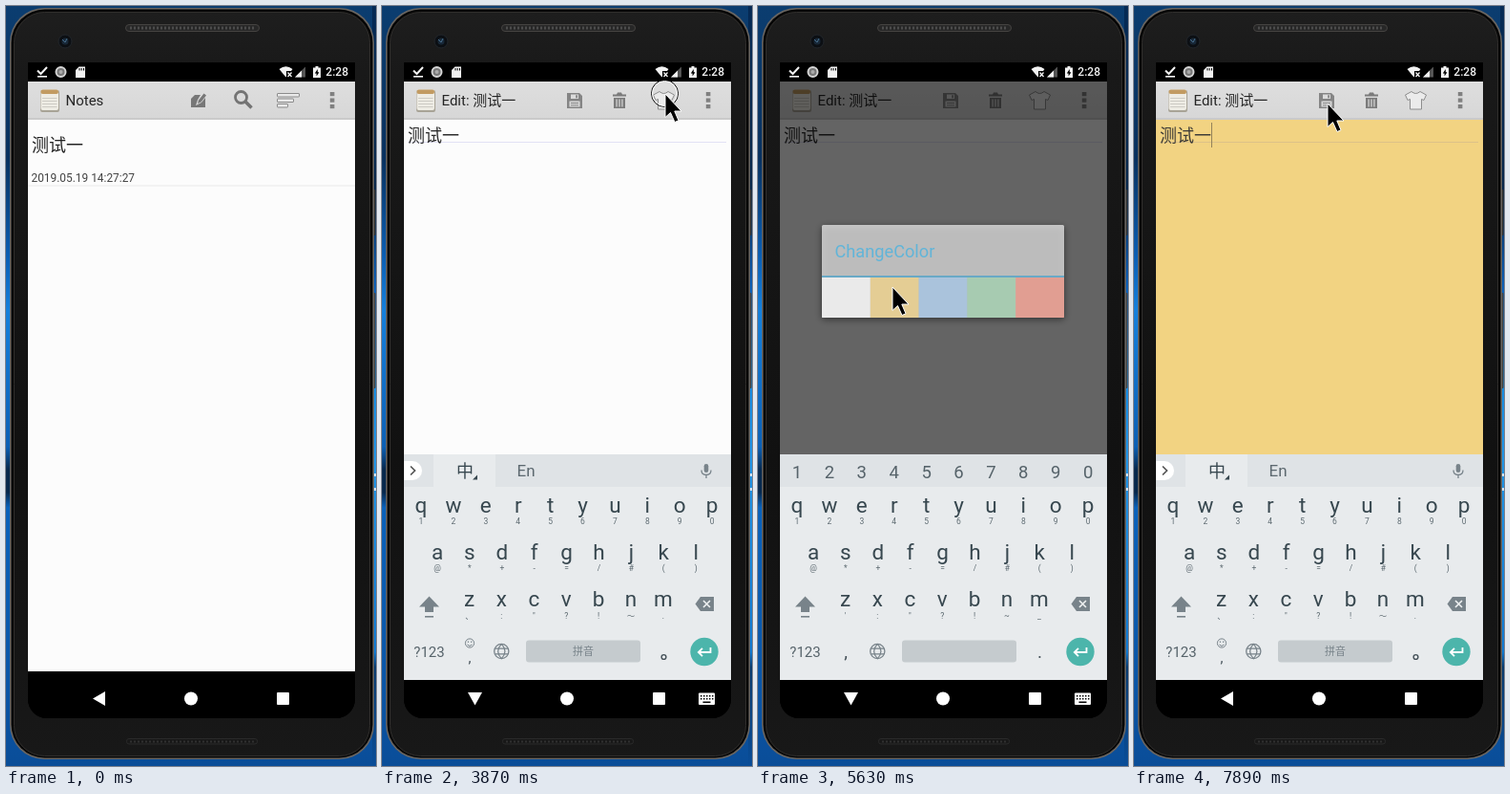
An HTML page with a canvas that plays this animation: 388x795 px, repeating every 8000 ms.

```html
<!DOCTYPE html>
<html lang="zh-CN">
<head>
<meta charset="utf-8">
<title>Notes colour change</title>
<style>
html, body { margin: 0; width: 100%; height: 100%; overflow: hidden; background: #0b3c70; }
canvas { display: block; }
</style>
</head>
<body>
<canvas id="stage" width="388" height="795"></canvas>
<script>
const LOOP = 8000;
const FONT = "Roboto, 'Noto Sans CJK SC', 'Noto Sans CJK', sans-serif";
const c = document.getElementById('stage').getContext('2d');

// ---------- helpers ----------
function rect(x, y, w, h, color) { c.fillStyle = color; c.fillRect(x, y, w, h); }

function round(x, y, w, h, r, fill, line) {
  c.beginPath();
  c.roundRect(x, y, w, h, r);
  if (fill) { c.fillStyle = fill; c.fill(); }
  if (line) { c.strokeStyle = line; c.stroke(); }
}

function disc(x, y, r, fill, line) {
  c.beginPath();
  c.arc(x, y, r, 0, Math.PI * 2);
  if (fill) { c.fillStyle = fill; c.fill(); }
  if (line) { c.strokeStyle = line; c.stroke(); }
}

function shape(d, fill, line, width = 1) {
  const p = new Path2D(d);
  if (fill) { c.fillStyle = fill; c.fill(p, 'evenodd'); }
  if (line) { c.lineWidth = width; c.strokeStyle = line; c.stroke(p); c.lineWidth = 1; }
}

function text(s, x, y, size, color, align = 'left', weight = 400) {
  c.font = `${weight} ${size}px ${FONT}`;
  c.textAlign = align;
  c.fillStyle = color;
  c.fillText(s, x, y);
}

function at(x, y, alpha, draw) {
  c.save();
  c.translate(x, y);
  c.globalAlpha *= alpha;
  draw();
  c.restore();
}

function fade(x0, y0, x1, y1, stops) {
  const g = c.createLinearGradient(x0, y0, x1, y1);
  stops.forEach(([p, color]) => g.addColorStop(p, color));
  return g;
}

// last entry whose time has come
function step(t, keys) {
  let value = keys[0][1];
  for (const [k, v] of keys) if (t >= k) value = v;
  return value;
}

const within = (t, spans) => spans.some(([a, b]) => t >= a && t < b);

// ---------- desktop and phone ----------
function desktop() {
  rect(0, 0, 388, 795, fade(0, 0, 0, 795, [
    [0, '#0b3d70'], [.2, '#08315f'], [.33, '#0b5fb4'], [.4, '#1580dc'], [.58, '#0c60b5'],
    [.61, '#08294d'], [.64, '#08294d'], [.66, '#0a62bb'], [.9, '#0a55a6'], [1, '#0a4d98']]));
  rect(384, 0, 4, 795, fade(0, 0, 0, 795, [
    [0, '#052a55'], [.24, '#06264a'], [.37, '#0b5db5'], [.5, '#168ae0'],
    [.6, '#2094e6'], [.85, '#0f78d0'], [.87, '#07396d'], [1, '#0a4d98']]));
  rect(385, 489, 3, 3, '#cfe4f6');
  rect(385, 504, 3, 3, '#cfe4f6');
}

function phone() {
  round(384, 192, 3.5, 48, 1, '#34322f');
  round(384, 300, 3.5, 100, 1, '#45423f');
  round(4, 2, 382, 786, 36, '#696561');
  round(5.5, 3.5, 379, 783, 35, '#060606');
  round(8.5, 6.5, 373, 778, 32, fade(0, 6, 0, 785,
    [[0, '#1e1e1e'], [.08, '#191919'], [.6, '#111'], [1, '#181818']]), '#302e2c');
  round(125.5, 19.5, 140, 7, 3.5, '#272727', '#454341');
  c.setLineDash([2, 2]);
  shape('M130 23H262', null, '#4c4c4c', 3);
  shape('M130 769.5H260', null, '#303030', 2);
  c.setLineDash([]);
  round(126.5, 766.5, 137, 5.5, 2.5, null, '#2a2a2a');
  disc(62, 37, 7, '#0c0f13', '#22262b');
  disc(62, 37, 3.5, '#182838');
  shape('M59 35L62 38L64 34', null, '#48708f');
}

function statusBar() {
  const w = '#f2f2f2';
  rect(23, 59, 343, 20, '#000');
  shape('M33 67.5L36.5 71L43 64', null, w, 2);
  rect(33, 73, 10, 1.6, w);
  c.lineWidth = 2;
  disc(57.5, 69, 5, '#777', '#d5d5d5');
  c.lineWidth = 1;
  disc(57.5, 69, 2, '#aaa');
  shape('M73 67L76.5 63.5H83V75H73ZM76.5 65V67.5H77.5V65ZM78.7 65V67.5H79.7V65ZM81 65V67.5H82V65Z', w);
  shape('M286.5 66Q293.5 60.5 300.5 66L299 68H294V73.5L293.5 74.5Z', w);
  shape('M295.5 69.5L299.5 74M299.5 69.5L295.5 74', null, w, 1.3);
  shape('M303 74.5L314 63.5V74.5Z', '#555');
  shape('M303 74.5L310 67.5V74.5Z', w);
  shape('M322 64.5H324.5V63H327.5V64.5H330V75H322ZM326.8 66L323.8 70.4H325.6V73.6L328.4 69.2H326.8Z', w);
  text('2:28', 359, 73.3, 12, w, 'right', 500);
}

function navBar(top, keyboardUp, extra) {
  const w = '#fff';
  rect(23, top, 343, 745 - top, '#000');
  shape(keyboardUp ? 'M90 718H105L97.5 731.5Z' : 'M91 724.5L104 717V732Z', w);
  disc(194, 724.5, 7, w);
  round(284, 718, 13, 13, 1, w);
  if (!extra) return;
  round(332, 718.5, 17, 12.5, 1, w);
  for (let i = 0; i < 5; i++) {
    rect(334 + i * 3, 721, 1.5, 1.5, '#000');
    rect(334 + i * 3, 724, 1.5, 1.5, '#000');
  }
  rect(336.5, 727.5, 8, 1.5, '#000');
}

// ---------- app screens ----------
function appBar(title) {
  rect(23, 79, 343, 40, fade(0, 79, 0, 118, [[0, '#dedede'], [1, '#d7d7d7']]));
  rect(23, 117.5, 343, 1, '#bdbdbd');
  round(36, 88, 20, 23, 2, '#a8a396');
  round(36.5, 87.5, 18.5, 21.5, 2, '#eeece4');
  round(36.5, 87.5, 18.5, 4.5, 2, '#c29b62');
  for (let y = 96; y < 108; y += 3) rect(38, y, 15.5, .8, '#c6c4bd');
  text(title, 62.5, 104.3, 15, '#252525');
  for (let y = 90; y < 107; y += 6.5) rect(339.8, y, 4.6, 4.2, '#808080');
}

function listScreen() {
  rect(23, 79, 343, 617, '#fcfcfc');
  appBar('Notes');
  shape('M194 97L198 93H204L201 98L199 104L205 101L209 96V106H194Z', '#777');
  shape('M201 102L202 98.5L207.5 91.5L210 93.5L204.5 100.5Z', '#777');
  c.lineWidth = 2.8;
  disc(246.5, 95.5, 6, null, '#747474');
  c.lineWidth = 1;
  shape('M251 100L257.5 106.5', null, '#747474', 3.6);
  [23, 17, 11].forEach((w, i) =>
    round(284.5, 91.5 + i * 5.5, w, 3.5, .5, '#e9e9e9', '#8b8b8b'));
  text('测试一', 27, 152, 18, '#222');
  text('2019.05.19 14:27:27', 26.5, 184.4, 11.9, '#444');
  rect(23, 187.5, 343, 1, '#ececec');
}

function editScreen(yellow, caret) {
  rect(23, 79, 343, 626, yellow ? '#f2d382' : '#fcfcfc');
  appBar('Edit: 测试一');
  const g = '#858585';
  shape('M194 91H207L210 94V107H194ZM198 92.5V97H206V92.5ZM203.2 93.2H205V96.3H203.2ZM196.5 99.5V105.5H207.5V99.5Z', g);
  rect(198, 101, 8, 1, g);
  rect(198, 103.3, 8, 1, g);
  shape('M242 92.5H246L247 90.5H251L252 92.5H256V94.5H242ZM243 96H255V107H243ZM245.5 97.5V105.5H246.7V97.5ZM248.4 97.5V105.5H249.6V97.5ZM251.3 97.5V105.5H252.5V97.5Z', '#7b7b7b');
  shape('M291 89.5Q295.5 93.5 300 89.5L306.5 93L304 98.5L301.5 97.5V108H289.5V97.5L287 98.5L284.5 93Z', '#ebebeb', '#8d8d8d');
  rect(27, 142, 334, 1, yellow ? '#dcc188' : '#e2e1f5');
  text('测试一', 27, 142, 18, yellow ? '#3c3a36' : '#2a2a2a');
  if (caret) rect(81, 122, 1, 26, yellow ? '#94835a' : '#8a8a8a');
}

// ---------- keyboard ----------
function keyRow(letters, hints, x, y, gap) {
  [...letters].forEach((k, i) => {
    text(k, x + i * 33.9, y, 22.5, '#37474f', 'center');
    text(hints[i], x + i * 33.9, y + gap, 8.5, '#5d6a71', 'center');
  });
}

function keyboard(pinyin) {
  const g = '#78838a';
  rect(23, 469, 343, 236, '#e8ebed');
  rect(23, 469, 343, 34, '#dfe3e6');
  if (pinyin) {
    rect(54, 469, 65, 34, '#e8ebed');
    round(13, 476, 29, 20, 10, '#fff');
    shape('M30 481.5L34.5 486L30 490.5', null, '#555', 1.7);
    text('中', 87, 492.5, 18, '#37474f', 'center');
    shape('M100 490.5V495.5H95Z', '#37474f');
    text('En', 151, 492, 17, '#5c686f', 'center');
    round(337.7, 479, 4.6, 9, 2.3, g);
    shape('M335 485.5Q335 490.5 340 490.5Q345 490.5 345 485.5M340 490.5V494', null, g, 1.3);
  } else {
    [...'1234567890'].forEach((n, i) => text(n, 41 + i * 33.9, 493.5, 18.5, '#56636a', 'center'));
  }
  keyRow('qwertyuiop', [...'1234567890'], 41, 530, 12);
  keyRow('asdfghjkl', [...'@*+-=/#()'], 58, 579, 12);
  keyRow('zxcvbnm', [...(pinyin ? '、:"?!～.' : '\':"?!~_')], 91.5, 628, 13);

  shape('M49.5 617.5L60 628.5H54V634H45V628.5H39Z', g);
  rect(45, 638, 9, 1.6, g);
  shape('M328.5 625.5L334 618H348V633H334Z', g);
  shape('M337 622L344 629M344 622L337 629', null, '#eef0f1', 1.6);

  text('?123', 49.5, 680.5, 15, '#56636a', 'center');
  if (pinyin) {
    disc(92, 666.5, 4.6, null, g);
    rect(89.8, 664.5, 1.3, 1.3, g);
    rect(93, 664.5, 1.3, 1.3, g);
    shape('M89.5 668Q92 671 94.5 668', null, g);
    text(',', 92, 687, 15, '#455159', 'center');
  } else {
    text(',', 92, 682, 19, '#455159', 'center');
  }
  c.lineWidth = 1.3;
  disc(125.3, 675, 7.6, null, g);
  c.lineWidth = 1;
  shape('M125.3 667.4Q118 675 125.3 682.6Q132.6 675 125.3 667.4M118.7 672.2H132M118.7 677.8H132', null, g, 1.2);
  round(151, 663.5, 120, 23, 3, '#c5cbce');
  if (pinyin) {
    text('拼音', 211, 679, 11, '#78838a', 'center');
    c.lineWidth = 1.4;
    disc(295.5, 681, 2.4, null, '#455159');
    c.lineWidth = 1;
  } else {
    text('.', 295.5, 682, 19, '#455159', 'center');
  }
  disc(338, 675.5, 14.7, '#4cb5ab');
  shape('M344.5 671V676H332.5M336 671.8L331.8 676L336 680.2', null, '#fff', 1.8);
}

// ---------- dialog ----------
function dialog() {
  c.save();
  c.shadowColor = 'rgba(0,0,0,.65)';
  c.shadowBlur = 7;
  c.shadowOffsetY = 2;
  round(67, 225.5, 254, 97, 1.5, '#f0f0f0');
  c.restore();
  text('ChangeColor', 80.5, 259.5, 18.2, '#3fb2e3');
  rect(67, 278.5, 254, 2, '#4aa3cb');
  ['#fdfdfd', '#f4d586', '#a4c6e9', '#a0d1ae', '#f09483'].forEach((color, i) =>
    rect(67 + i * 50.8, 280.5, 50.8, 42, color));
}

// ---------- pointer ----------
const PATH = [
  [290, 294, 676], [440, 240, 470], [600, 165, 235], [750, 141, 172],
  [2480, 141, 172], [2780, 268, 142], [3080, 303, 88], [3240, 303, 88], [3320, 297, 92],
  [4640, 297, 92], [4900, 215, 200], [5180, 141, 294],
  [6430, 141, 294], [6530, 188, 371], [6620, 206, 335], [6760, 207, 180], [6890, 203, 102],
];

function pointerAt(t) {
  const q = t - (t - 5) % 75;
  let i = 0;
  while (i < PATH.length - 2 && q > PATH[i + 1][0]) i++;
  const [t0, x0, y0] = PATH[i], [t1, x1, y1] = PATH[i + 1];
  const k = Math.min(1, Math.max(0, (q - t0) / (t1 - t0)));
  return [Math.round(x0 + (x1 - x0) * k), Math.round(y0 + (y1 - y0) * k)];
}

function pointer(t) {
  if (t < 290) return;
  const [x, y] = pointerAt(t);
  at(x, y, 1, () => {
    if (within(t, [[1150, 1300], [3870, 4020], [5250, 5400], [7360, 7510]])) {
      disc(-.5, -.5, 14, null, '#000');
      disc(-.5, -.5, 13, null, '#fff');
    }
    shape('M0 0V24.5L5.5 19.5L10 29.5L14 27.8L9.8 18H17Z', '#000', '#fff');
  });
}

// ---------- timeline ----------
function draw(t) {
  const enter = step(t, [[0, null], [1850, [40, .29]], [1920, [16, .7]], [2000, [5, 1]], [2170, [0, 1]]]);
  const keys = step(t, [[0, null], [2170, [110, .4]], [2240, [30, .85]], [2390, [0, 1]]]);
  const box = step(t, [[0, null], [4400, [9, .5]], [4480, [0, 1]],
    [5630, [3.5, .72]], [5700, [11, .35]], [5780, null]]);
  const dim = step(t, [[0, 0], [4400, .2], [4480, .5], [4560, .6],
    [5700, .45], [5780, .28], [5860, .1], [5940, 0]]);
  const caret = within(t, [[1850, 2470], [2980, 3780], [5860, 6110], [6650, 7190], [7660, LOOP]]);
  const pinyin = !within(t, [[4400, 5780]]);
  const keyNav = t >= 2390 && t < 7890;

  desktop();
  phone();
  c.save();
  c.beginPath();
  c.roundRect(23, 59, 343, 686, [0, 0, 20, 20]);
  c.clip();
  rect(23, 59, 343, 686, '#000');
  if (!enter || enter[1] < 1) listScreen();
  if (enter) at(0, enter[0], enter[1], () => editScreen(t >= 5700, caret));
  if (enter && enter[0] && enter[1] === 1) at(0, 0, 1, () => rect(23, 79, 343, enter[0], '#dedede'));
  if (dim) rect(23, 79, 343, 626, `rgba(0,0,0,${dim})`);
  if (box) at(0, box[0], box[1], dialog);
  if (keys) at(0, keys[0], keys[1], () => keyboard(pinyin));
  statusBar();
  navBar(enter ? 705 : 696, keyNav, keyNav);
  c.restore();
  pointer(t);
}

const start = performance.now();
function tick() {
  draw((performance.now() - start) % LOOP);
  requestAnimationFrame(tick);
}
tick();
</script>
</body>
</html>
```
